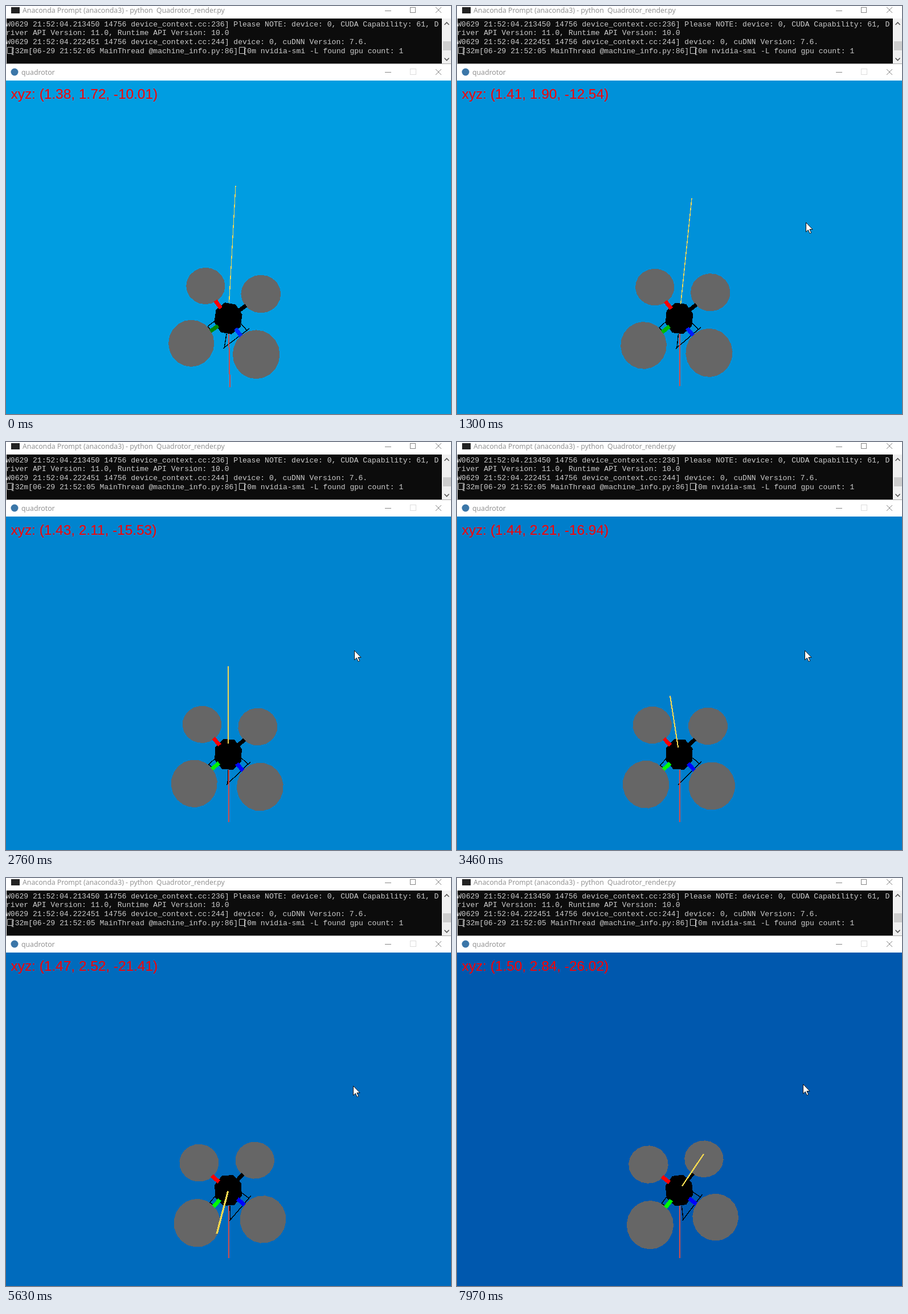
These frames come from a looping animation (781x717 px, 8 s). An HTML page:

```html
<!DOCTYPE html>
<html lang="en">
<head>
<meta charset="utf-8">
<title>quadrotor</title>
<style>
  html, body { margin: 0; width: 100%; height: 100%; overflow: hidden; }
  svg { display: block; width: 781px; height: 717px; }
  .title { font: 12.25px "Noto Sans", sans-serif; fill: #939393; white-space: pre; }
  .console { font: 13.06px "Liberation Mono", monospace; fill: #ccc; white-space: pre; }
  .glyph { fill: none; stroke: #ccc; }
  .buttons { fill: none; stroke: #858585; shape-rendering: crispEdges; }
  .cross { shape-rendering: auto; }
  .scene { shape-rendering: crispEdges; fill: none; }
  #xyz { font: 24.4px "Liberation Sans", Arial, sans-serif; fill: #f00; }
</style>
</head>
<body>
<svg viewBox="0 0 781 717">
  <rect width="781" height="717" fill="#fff"/>
  <rect x="9" y="2" width="15" height="11" fill="#222"/>
  <text class="title" x="29" y="12" xml:space="preserve">Anaconda Prompt (anaconda3) - python  Quadrotor_render.py</text>
  <rect x="1" y="22" width="764" height="79" fill="#0c0c0c"/>
  <g class="console">
    <text x="0" y="35.5">W0629 21:52:04.213450 14756 device_context.cc:236] Please NOTE: device: 0, CUDA Capability: 61, D</text>
    <text x="0" y="51">river API Version: 11.0, Runtime API Version: 10.0</text>
    <text x="0" y="67">W0629 21:52:04.222451 14756 device_context.cc:244] device: 0, cuDNN Version: 7.6.</text>
    <text x="7.84" y="82.5">[32m[06-29 21:52:05 MainThread @machine_info.py:86]</text>
    <text x="415.5" y="82.5">[0m nvidia-smi -L found gpu count: 1</text>
  </g>
  <path class="glyph" d="M2.5 72.5h10v11h-10zM409.5 72.5h10v11h-10z"/>
  <rect x="766" y="22" width="15" height="79" fill="#f0f0f0"/>
  <rect x="767" y="62" width="14" height="16" fill="#cdcdcd"/>
  <path d="M769.5 33l4-4 4 4M769.5 91.5l4 4 4-4" fill="none" stroke="#555" stroke-width="1.6"/>
  <path d="M0 101.5h781" stroke="#aaa"/>
  <circle cx="15" cy="116" r="6.5" fill="#3b76a8"/>
  <text class="title" x="27" y="121">quadrotor</text>
  <g class="buttons">
    <path d="M665 8.5h11M709.5 2.5h9v9h-9zM665 116.5h11"/>
    <path d="M709.5 110.5h10v10h-10z" stroke="#ddd"/>
    <path class="cross" d="M754 2l10 10m0-10l-10 10M754 111l10 10m0-10l-10 10"/>
  </g>
  <rect id="sky" y="131" width="781" height="586"/>
  <g id="scene" class="scene"></g>
  <text id="xyz" x="8.5" y="163"></text>
  <path id="cursor" d="M0 0v16.5l3.8-3.6 2.9 6.3 2.6-1.2-2.9-6h5.2z" fill="#fff" stroke="#111"/>
</svg>
<script>
const LOOP = 8000, REFRESH = LOOP / 103.4;
const CENTER = [390, 549];

// Refresh count, altitude, and tip of the yellow axis relative to the center
const FLIGHT = [
  [0, -10.01, 13, -233],
  [17, -12.54, 22, -211],
  [27, -14.12, 19, -198],
  [45, -16.94, -16, -103],
  [73, -21.41, -20, 76],
  [88, -23.61, 7, 46],
  [103, -26.02, 43, -64],
];

const byId = id => document.getElementById(id);
const rgb = (...c) => `rgb(${c.map(Math.round)})`;
const rad = deg => deg * Math.PI / 180;

function set(el, attrs) {
  for (const name in attrs) el.setAttribute(name, attrs[name]);
}
function shape(attrs, tag = 'polyline') {
  const el = document.createElementNS('http://www.w3.org/2000/svg', tag);
  set(el, attrs);
  return byId('scene').appendChild(el);
}
const stroke = (color, width) => shape({ stroke: color, 'stroke-width': width });
const setPoints = (el, points) => set(el, { points: points.join(' ') });

function polar(deg, rx, ry = rx, [cx, cy] = CENTER) {
  return [cx + rx * Math.cos(rad(deg)), cy + ry * Math.sin(rad(deg))];
}
const ring = (n, turn, rx, ry, center) =>
  Array.from({ length: n }, (_, i) => polar(turn + i * 360 / n, rx, ry, center));

// Cubic Hermite curve through one column of the flight keys
function flight(n, col) {
  const last = FLIGHT.length - 1;
  let i = 0;
  while (i < last - 1 && n >= FLIGHT[i + 1][0]) i++;
  const [a, b] = [FLIGHT[i], FLIGHT[i + 1]];
  const span = b[0] - a[0], u = (n - a[0]) / span;
  const slope = j => {
    const p = FLIGHT[Math.max(0, j - 1)], q = FLIGHT[Math.min(last, j + 1)];
    return (q[col] - p[col]) / (q[0] - p[0]) * span;
  };
  const ease = u * u * (3 - 2 * u);
  return a[col] + (b[col] - a[col]) * ease
    + u * (1 - u) * (slope(i) * (1 - u) - slope(i + 1) * u);
}

// Landing gear as [angle from yaw, radius] points
const legs = [
  [[45.5, 53.5], [-28.5, 41]],
  [[42, 27], [43.5, 52]],
  [[-32, 24], [-21, 40]],
  [[116, 23.5], [104.5, 38.5], [91, 36.5]],
].map(points => ({ points, el: stroke('#000', 1.4) }));
const redAxis = stroke('#d54d4a', 2);
const rotors = [0, 90, 180, 270].map(turn => ({ turn, el: shape({ fill: '#666' }, 'polygon') }));
const body = shape({ fill: '#000' }, 'polygon');
const [blueArm, greenArm, redArm, blackArm] = ['#00f', '#0f0', '#f00', '#000'].map(c => stroke(c, 7));
const arms = [blueArm, greenArm, redArm, blackArm];
const yellowAxis = stroke('#f6d850', 1.4);

function drawDrone(s) {
  const yaw = 54.1 - 20.5 * s + 5.1 * s * s;
  for (const { points, el } of legs) setPoints(el, points.map(([deg, r]) => polar(yaw + deg, r)));
  arms.forEach((el, i) => setPoints(el, [polar(yaw + 90 * i, 22), polar(yaw + 90 * i, 38.5)]));

  for (const { turn, el } of rotors) {
    const near = 1 / (1 - 0.118 * Math.sin(rad(yaw + turn)));
    const hub = polar(yaw + turn, 75 * near, 73.6 * near, [390.5, 546.4]);
    setPoints(el, ring(20, yaw, 37.4 * near, 37 * near ** 1.5, hub));
  }
  setPoints(body, ring(8, yaw + 22.5, 25.3, 28.6));

  const lit = Math.min(1, s / 0.38);
  set(greenArm, { stroke: rgb(0, 135 + 120 * lit, 0) });
  set(blueArm, { stroke: rgb(0, 45 * (1 - lit), 255) });
}

function drawAxes(n, s) {
  const sway = Math.max(0, 1 - s * 6);
  setPoints(redAxis, [[391, 576], [391 + 2 * sway, 668 + 2 * sway]]);

  const dx = flight(n, 2), dy = flight(n, 3);
  const hidden = dy < 0 ? 0.12 : 0.02;
  setPoints(yellowAxis, [hidden, 1].map(k => [CENTER[0] + k * dx, CENTER[1] + k * dy]));
  set(yellowAxis, { 'stroke-width': 1.3 + (dy + 233) * 0.0062 });
}

function drawCursor(t, s) {
  const left = Math.exp((380 - t) / 288);
  const x = Math.round(614 - 6 * s + 81 * left ** 2);
  const y = Math.round(367.5 - 5 * s ** 3 + 337 * left);
  set(byId('cursor'), {
    transform: `translate(${x - 0.5} ${y - 0.5})`,
    visibility: t < 380 ? 'hidden' : 'visible',
  });
}

function draw(n) {
  const z = flight(n, 1);
  const s = (-10.01 - z) / 16.01; // share of the descent done
  const position = [1.38 + 0.116 * s ** 0.8, 1.72 + 1.122 * s, z];
  byId('xyz').textContent = `xyz: (${position.map(v => v.toFixed(2)).join(', ')})`;
  set(byId('sky'), { fill: rgb(0, 157 - 75 * s + 6 * s * s, 225 - 51 * s) });
  drawDrone(s);
  drawAxes(n, s);
  drawCursor(n * REFRESH, s);
}

function tick() {
  const t = performance.now() % LOOP;
  draw(Math.min(103, Math.floor((t + 27) / REFRESH)));
  requestAnimationFrame(tick);
}
tick();
</script>
</body>
</html>
```
